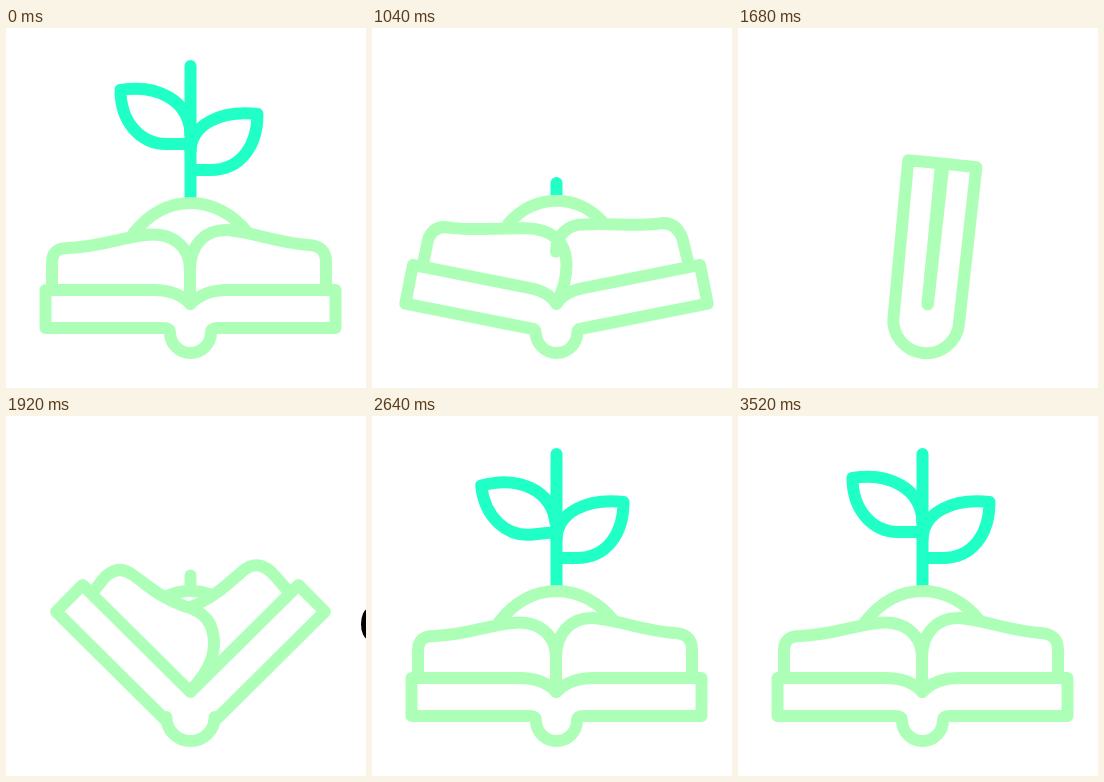
Recreate the animation shown at these times as an HTML page. Size 360 by 360 pixels, loop 3600 ms.

```html
<!DOCTYPE html>
<html lang="en">
<head>
<meta charset="utf-8">
<title>Growing book</title>
<style>
html, body { margin: 0; width: 100%; height: 100%; overflow: hidden; background: #fff; }
svg { display: block; width: 100vw; height: 100vh; }
path { fill: none; stroke-width: 12; stroke-linejoin: round; }
#plant path { stroke: #1fffc6; }
#book path { stroke: #adffb8; }
#stem, #book path { stroke-linecap: round; }
</style>
</head>
<body>
<svg viewBox="0 0 360 360">
  <ellipse id="spot" cx="362" cy="208" rx="7" ry="15"/>
  <g id="plant">
    <path id="leafL" d="M0 0H-24C-50 0 -70 -22 -70 -54C-34 -60 0 -44 0 -8"/>
    <path id="leafR" d="M0 0H20C50 0 67 -24 67 -56C31 -60 0 -46 0 -18"/>
    <path id="stem"/>
  </g>
  <g id="book">
    <path id="mound"/>
    <path id="pageL"/>
    <path id="pageR"/>
    <path id="cover"/>
  </g>
</svg>
<script>
const LOOP = 3600, STEP = 80;
const CX = 184.5, CY = 276;
const el = id => document.getElementById(id);
const set = (id, name, value) => el(id).setAttribute(name, value);

// Each shape has an open, a half folded and a closed pose.
const poses = {
  mound: [
    "M127 206C145 183 165 175 185 175C207 175 228 187 242 205",
    "M161 180C168 177 176 175 184 175C192 175 198 176 203 178",
    "M184 200C184 200 184 200 184 200C184 200 184 200 184 200"
  ],
  pageL: [
    "M46 262L46 234Q46 220 62 220C95 219 112 210 140 207C166 204 184 218 184 242Q184 260 184 276",
    "M87 176L99 161Q113 148 127 159C145 172 155 182 178 190C200 196 208 208 208 228Q208 250 185 274",
    "M184 138L184 140Q184 140 184 150C184 170 184 190 184 200C184 210 184 220 184 230Q184 250 184 276"
  ],
  pageR: [
    "M320 262L320 234Q320 218 303 217C272 215 250 205 222 202C200 201 184 216 184 242",
    "M283 176L269 160Q253 142 238 154C222 168 212 178 190 189C188 190 186 190 184 191",
    "M184 138L184 140Q184 140 184 150C184 170 184 190 184 200C184 200 184 200 184 200"
  ]
};

function ease(t, from, to) {
  const x = Math.min(1, Math.max(0, (t - from) / (to - from)));
  return x < 0.5 ? 2 * x * x : 1 - 2 * (1 - x) * (1 - x);
}

// Falls from 1 to 0, then rises back.
const dip = (t, a, b, c, d) => 1 - ease(t, a, b) + ease(t, c, d);

const nums = s => s.match(/\d+/g).map(Number);

function blend([open, half, closed], x) {
  const a = nums(open), b = nums(half), c = nums(closed);
  const wa = (2 * x - 1) * (x - 1), wb = 4 * x * (1 - x), wc = x * (2 * x - 1);
  let i = 0;
  return open.replace(/\d+/g, () => {
    const v = a[i] * wa + b[i] * wb + c[i] * wc;
    i++;
    return v.toFixed(2);
  });
}

function coverPath(x) {
  const ang = x * 89.5 * Math.PI / 180, cos = Math.cos(ang), sin = Math.sin(ang);
  const flat = Math.max(0, 1 - 2 * x);
  const top = -14 * flat;
  const low = 24 + 45 * x - 36 * x * x;
  const len = 145 + 31.5 * x - 35 * x * x;
  const end = 27 - 64 * x + 20 * x * x;
  const r = 20.5 + 2 * x + 10.5 * x * x;
  const pt = (side, px, py) => (CX + side * px).toFixed(2) + " " + (CY + py).toFixed(2);
  const at = (side, u, v) => pt(side, u * cos + v * sin, -u * sin + v * cos);
  const endY = -end * sin + low * cos;
  const half = side =>
    `M${pt(side, 0, 0)}Q${at(side, 13 * flat, top)} ${at(side, 37 * flat, top)}` +
    `L${at(side, len, top)}L${at(side, len, low)}L${at(side, end, low)}` +
    `Q${pt(side, r, endY)} ${pt(side, r, 49 - r)}` +
    `A${r} ${r} 0 0 ${side < 0 ? 0 : 1} ${pt(0, 0, 49)}`;
  return half(-1) + half(1);
}

function leaf(id, base, scale, turn) {
  set(id, "transform", `translate(${CX} ${base}) rotate(${turn}) scale(${scale})`);
  set(id, "visibility", scale > 0.02 ? "visible" : "hidden");
}

function draw(t) {
  const fold = 1 - dip(t, 960, 1280, 1760, 2080);
  const rock = t > 1280 && t < 1840 ? -6 * Math.sin(2 * Math.PI * (t - 1280) / 560) : 0;
  set("book", "transform", `rotate(${rock} ${CX} 329)`);
  for (const id in poses) set(id, "d", blend(poses[id], fold));
  set("mound", "visibility", fold < 0.85 ? "visible" : "hidden");
  set("cover", "d", coverPath(fold));

  const top = 162 - 124 * dip(t, 140, 1220, 1840, 2640);
  set("stem", "d", `M${CX} ${top}V169`);
  el("stem").style.stroke = fold > 0.3 ? "#adffb8" : "";
  set("plant", "visibility", fold < 0.7 ? "visible" : "hidden");

  const left = dip(t, 300, 940, 2200, 2600);
  const right = dip(t, 460, 1000, 2080, 2560);
  const sway = t > 2480 && t < 2800 ? -6 * Math.sin(Math.PI * (t - 2480) / 320) : 0;
  leaf("leafL", Math.max(116, top), fold < 0.7 ? left : 0, sway);
  leaf("leafR", Math.max(142, top), fold < 0.7 ? right : 0, Math.min(12, 32 * (1 - right)));

  set("spot", "visibility", fold > 0.3 && fold < 0.7 ? "visible" : "hidden");
}

const start = performance.now();
function tick() {
  const t = (performance.now() - start) % LOOP;
  draw(Math.floor(t / STEP) * STEP);
  requestAnimationFrame(tick);
}
tick();
</script>
</body>
</html>
```
